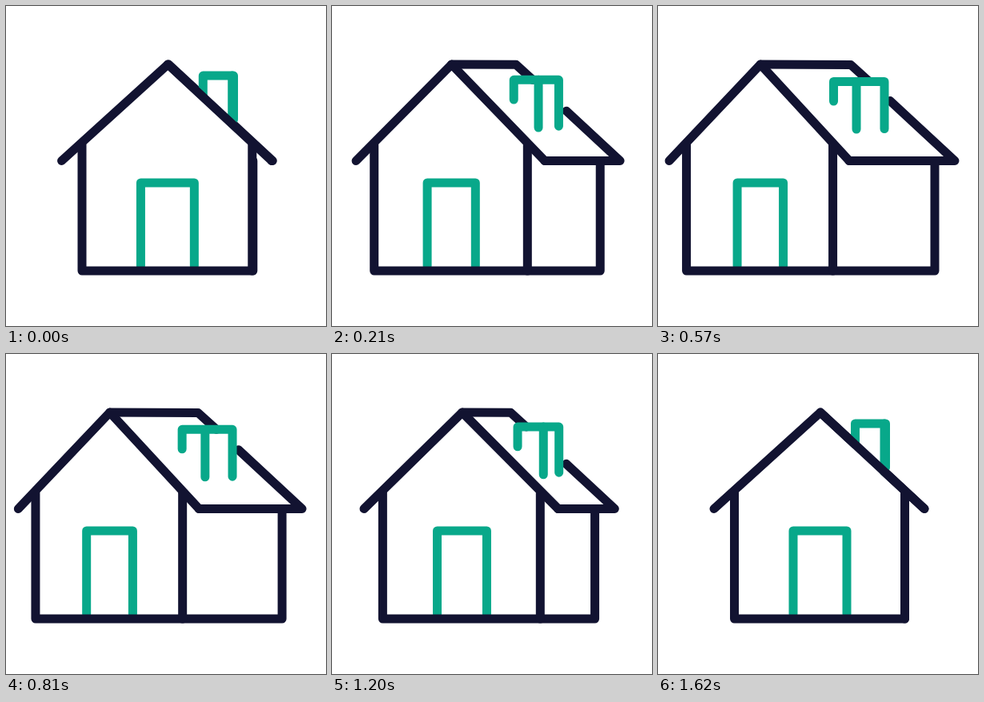
These frames come from a looping animation (400 px wide and 400 px high, 3.65 s). An HTML page with a canvas:

```html
<!DOCTYPE html>
<html lang="en">
<head>
<meta charset="utf-8">
<title>House turning</title>
<style>
  html, body { margin: 0; width: 100%; height: 100%; overflow: hidden; background: #fff; }
  canvas { display: block; width: 100vw; height: 100vh; }
</style>
</head>
<body>
<canvas id="stage"></canvas>
<script>
const SIZE = 400, LOOP = 3650, STEP = 30;
const NAVY = '#121331', GREEN = '#08a88a';
const PEAK = 73, EAVE = 193.5, FLOOR = 331;
const canvas = document.getElementById('stage');
const ctx = canvas.getContext('2d');

function resize() {
  const dpr = window.devicePixelRatio || 1;
  canvas.width = Math.round(innerWidth * dpr);
  canvas.height = Math.round(innerHeight * dpr);
}

// Cubic Bezier easing with flat ends: handles (x1, 0) and (x2, 1).
function ease(t, x1, x2) {
  if (t <= 0) return 0;
  if (t >= 1) return 1;
  let lo = 0, hi = 1, u = 0.5;
  for (let i = 0; i < 30; i++) {
    u = (lo + hi) / 2;
    const v = 1 - u;
    const x = 3 * u * v * v * x1 + 3 * u * u * v * x2 + u * u * u;
    if (x < t) lo = u; else hi = u;
  }
  return u * u * (3 - 2 * u);
}

// 0 = seen from the front, 1 = fully turned.
function turnAt(ms) {
  return ms < 600 ? ease((ms + 30) / 630, 0.33, 0.07)
                  : 1 - ease((ms - 600) / 1020, 0.855, 0.407);
}

function line(color, ...points) {
  ctx.strokeStyle = color;
  ctx.beginPath();
  points.forEach(([x, y]) => ctx.lineTo(x, y));
  ctx.stroke();
}

function draw(p) {
  const mix = (a, b) => a + (b - a) * p;
  const scale = Math.min(canvas.width, canvas.height) / SIZE;
  ctx.setTransform(1, 0, 0, 1, 0, 0);
  ctx.fillStyle = '#fff';
  ctx.fillRect(0, 0, canvas.width, canvas.height);
  ctx.setTransform(scale, 0, 0, scale, 0, 0);
  ctx.lineWidth = 11;
  ctx.lineCap = ctx.lineJoin = 'round';

  const apex = mix(203, 128), backApex = mix(203, 241);
  const eaveL = mix(70, 14), eaveR = mix(333, 239), backEave = mix(333, 371);
  const wallL = mix(95.5, 35.5), wallR = mix(308.5, 218.5), backWall = mix(308.5, 346);
  const doorL = mix(169, 99), doorR = mix(236, 156.5);
  const left = mix(246.5, 219.5), mid = mix(283, 248), right = mix(284.5, 283);
  const top = mix(87, 94.5);

  const slope = (backEave - backApex) / (EAVE - PEAK);
  const backY = x => PEAK + (x - backApex) / slope;
  const roofY = (x, end) => PEAK + (EAVE - PEAK) * (x - apex) / (end - apex);

  // Back of the roof, broken where the chimney stands
  const stop = Math.max(left, backApex + (top - PEAK) * slope);
  const resume = 282.4 + 33 * p - 25.4 * p * p;
  line(NAVY, [apex, PEAK], [backApex, PEAK + 0.5 * p], [stop, backY(stop)]);
  line(NAVY, [resume, backY(resume)], [backEave, EAVE], [eaveR, EAVE]);

  // Chimney
  line(GREEN, [left, mix(112, 119)], [left, top], [right, top], [right, mix(142, 153.5)]);
  line(GREEN, [mid, top], [mid, mix(147, 154)]);

  // Door
  line(GREEN, [doorL, FLOOR - 6], [doorL, 221], [doorR, 221], [doorR, FLOOR - 6]);

  // Walls and front gable
  line(NAVY, [wallL, roofY(wallL, eaveL) + 3], [wallL, FLOOR], [backWall, FLOOR], [backWall, EAVE]);
  line(NAVY, [wallR, roofY(wallR, eaveR) + 3], [wallR, FLOOR]);
  line(NAVY, [eaveL, EAVE], [apex, PEAK], [eaveR, EAVE]);
}

const start = performance.now();
function tick() {
  const ms = (performance.now() - start) % LOOP;
  draw(turnAt(Math.floor(ms / STEP) * STEP));
  requestAnimationFrame(tick);
}

addEventListener('resize', resize);
resize();
tick();
</script>
</body>
</html>
```
